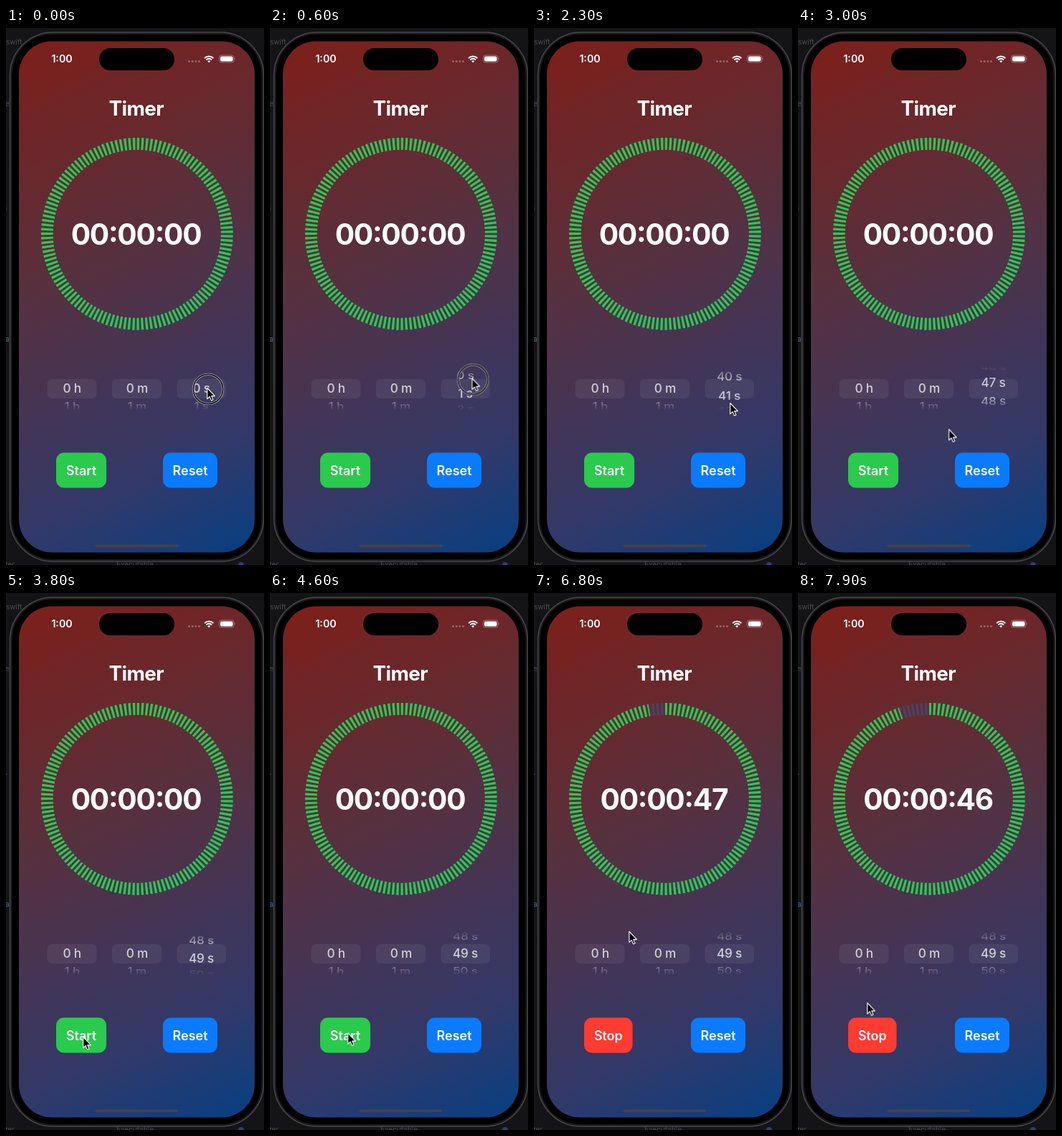
Write an HTML page that moves like this. It is 360 by 748 pixels and loops after 8 s.

```html
<!DOCTYPE html>
<html lang="en">
<head>
<meta charset="utf-8">
<title>Timer</title>
<style>
  html, body { margin: 0; width: 100%; height: 100%; overflow: hidden; background: #141416; }
  svg { display: block; width: 360px; height: 748px; font-family: Inter, Roboto, sans-serif; }
  text { text-anchor: middle; fill: #fff; }
  .code text { text-anchor: start; font-size: 10px; fill: #4b4b50; }
  .title { font-size: 27.8px; font-weight: 700; letter-spacing: -.55px; }
  .clock { font-size: 40.6px; font-weight: 700; letter-spacing: -1.2px; font-feature-settings: "case"; }
  .status { font-size: 14.2px; font-weight: 600; }
  .label { font-size: 18px; font-weight: 600; }
  .wheel { font-size: 17.2px; font-weight: 500; letter-spacing: -.2px; }
  .dial circle { fill: none; stroke-width: 16.8; }

  .start, .stop, .touch { animation: 8s step-end infinite; }
  .start { animation-name: start; }
  .stop { animation-name: stop; }
  .touch { animation-name: touch; }
  .cursor { animation: move 8s ease-in-out infinite; }
  @keyframes start { 0% { opacity: 1 } 58.125%, 100% { opacity: 0 } }
  @keyframes stop { 0% { opacity: 0 } 58.125%, 100% { opacity: 1 } }
  @keyframes touch { 0% { opacity: 1 } 20.25%, 100% { opacity: 0 } }
  @keyframes move {
    0%, 1.25% { transform: translate(282px, 503px); animation-timing-function: cubic-bezier(.33, 0, .67, .33) }
    18.75% { transform: translate(292px, 398px); animation-timing-function: linear }
    20.25% { transform: translate(292px, 335px) }
    28.75%, 33.75% { transform: translate(275px, 524px) }
    42.5%, 52.5% { transform: translate(109px, 620px) }
    55%, 70.6% { transform: translate(110px, 614.5px) }
    76.25%, 85% { transform: translate(134px, 473px); animation-timing-function: ease-in }
    87.5% { transform: translate(83px, 546px); animation-timing-function: ease-out }
    90%, 100% { transform: translate(98px, 572.5px) }
  }
</style>
</head>
<body>
<svg viewBox="0 0 360 748">
  <defs>
    <linearGradient id="sky" gradientUnits="userSpaceOnUse" x1="18" y1="18" x2="347" y2="731">
      <stop stop-color="#7e1f19"/><stop offset=".4" stop-color="#58303d"/>
      <stop offset=".8" stop-color="#333969"/><stop offset="1" stop-color="#063f83"/>
    </linearGradient>
    <linearGradient id="fade" gradientUnits="userSpaceOnUse" x1="0" y1="471" x2="0" y2="533">
      <stop stop-color="#000"/><stop offset=".3" stop-color="#fff"/>
      <stop offset=".7" stop-color="#fff"/><stop offset="1" stop-color="#000"/>
    </linearGradient>
    <mask id="window" maskUnits="userSpaceOnUse" x="40" y="471" width="290" height="62">
      <rect x="40" y="471" width="290" height="62" fill="url(#fade)"/>
    </mask>
    <mask id="left" maskUnits="userSpaceOnUse" x="-140" y="-140" width="280" height="280">
      <circle id="arc" r="125.5" fill="none" stroke="#fff" stroke-width="18"/>
    </mask>
  </defs>

  <g class="code">
    <text x="0" y="23">swift</text>
    <text x="-1" y="109">e</text>
    <text x="-4" y="254" style="fill:#8a4668">s</text>
    <text x="-4" y="345" style="fill:#50689a">t</text>
    <text x="-1" y="437" style="fill:#50689a">a</text>
    <text x="-1" y="751">ter</text>
    <text x="154" y="751">Executable</text>
    <circle cx="328" cy="748" r="4" fill="#20437f"/>
  </g>

  <rect x="5.5" y="6" width="354" height="737" rx="60" fill="#1b1b1d" stroke="#47474a" stroke-width="1.5"/>
  <rect x="8.5" y="9" width="348" height="731" rx="56"/>
  <rect x="18" y="18.5" width="329" height="712" rx="46" fill="url(#sky)"/>
  <rect x="130" y="28" width="105" height="31" rx="15.5"/>

  <text class="status" x="78" y="48">1:00</text>
  <g fill="#fff" fill-opacity=".3">
    <circle cx="255.5" cy="46.5" r="1.4"/><circle cx="260.2" cy="46.5" r="1.4"/>
    <circle cx="264.9" cy="46.5" r="1.4"/><circle cx="269.6" cy="46.5" r="1.4"/>
  </g>
  <g fill="none" stroke="#fff" stroke-width="2">
    <path d="M277 42a8.8 8.8 0 0 1 12.4 0M279.3 44.4a5.5 5.5 0 0 1 7.8 0"/>
    <path d="M281.2 46.2a2.9 2.9 0 0 1 4 0l-2 2.1z" fill="#fff" stroke="none"/>
  </g>
  <rect x="297.5" y="38" width="20.5" height="10" rx="3.2" fill="none" stroke="#fff" stroke-opacity=".45" stroke-width=".8"/>
  <rect x="299" y="39.4" width="17.5" height="7.2" rx="2" fill="#fff"/>
  <path d="M319 41.5q1.5 1.5 0 3z" fill="#fff" fill-opacity=".5"/>

  <text class="title" x="181.8" y="122">Timer</text>
  <g class="dial" transform="translate(182.8 286.8) rotate(-90)">
    <circle class="ticks" r="125.5" stroke="#46456a"/>
    <g mask="url(#left)"><circle class="ticks" r="125.5" stroke="#2aca50"/></g>
  </g>
  <text class="clock" id="clock" x="181.5" y="302">00:00:00</text>

  <g fill="#fff" fill-opacity=".06">
    <rect x="57.5" y="489" width="69" height="27" rx="6.5"/>
    <rect x="148" y="489" width="69" height="27" rx="6.5"/>
    <rect x="238.5" y="489" width="68.5" height="27" rx="6.5"/>
  </g>
  <g class="wheel" id="wheels" mask="url(#window)"></g>

  <g class="label">
    <g class="start">
      <rect x="70" y="591.5" width="70" height="49" rx="11" fill="#2aca4d"/><text x="105" y="622.5">Start</text>
    </g>
    <g class="stop">
      <rect x="70" y="591.5" width="67.5" height="49" rx="11" fill="#ff3b32"/><text x="103.7" y="622.5">Stop</text>
    </g>
    <rect x="219" y="591.5" width="76" height="49" rx="11" fill="#0a7aff"/><text x="257" y="622.5">Reset</text>
  </g>
  <rect x="124.5" y="719.5" width="116" height="3.4" rx="1.7" fill="#4a4148"/>

  <g class="cursor">
    <g class="touch" fill="none">
      <circle r="20.6" stroke="#cfcad0" stroke-opacity=".8" stroke-width="3.2"/>
      <circle r="20.6" stroke="#1a1518" stroke-width="1.7"/>
    </g>
    <path d="M-1.2 -1.5v15.2l3.4-3.2 2.3 5.4 2.5-1.1-2.3-5.2h4.7z" stroke="#fff" stroke-width="1.1" stroke-linejoin="round"/>
  </g>
</svg>
<script>
  const LOOP = 8, TOTAL = 49, START = 4.65, FADE = .4;
  const TICKS = [5.62, 6.63, 7.7];
  const RADIUS = 35, ROW_ANGLE = .755, MID = 502;
  const arc = document.getElementById('arc');
  const clock = document.getElementById('clock');
  const wheels = document.getElementById('wheels');
  const length = 2 * Math.PI * 125.5, pitch = length / 131;

  const clamp = x => Math.min(1, Math.max(0, x));
  const ease = x => x * x * (3 - 2 * x);

  document.querySelectorAll('.ticks').forEach(ring =>
    ring.setAttribute('stroke-dasharray', `${pitch * .52} ${pitch * .48}`));

  function makeWheel(x, unit) {
    const rows = Array.from({ length: 5 }, () =>
      wheels.appendChild(document.createElementNS('http://www.w3.org/2000/svg', 'text')));
    return pos => rows.forEach((row, i) => {
      const n = Math.round(pos) + i - 2;
      const angle = (n - pos) * ROW_ANGLE;
      const shown = n >= 0 && Math.abs(angle) < 1.5;
      row.textContent = shown ? `${n} ${unit}` : '';
      if (!shown) return;
      const y = MID + RADIUS * Math.sin(angle), squash = Math.cos(angle);
      row.setAttribute('transform', `translate(${x} ${y}) scale(1 ${squash}) translate(0 6.2)`);
      row.setAttribute('fill-opacity', .75 * squash);
    });
  }

  const hours = makeWheel(92.3, 'h');
  const minutes = makeWheel(182.8, 'm');
  const seconds = makeWheel(272.6, 's');
  hours(0);
  minutes(0);

  // Drag, flick, then exponential slow-down to the chosen row.
  function scroll(t) {
    const glide = s => TOTAL - 8.37 * Math.exp((2.3 - s) / .437);
    if (t < 1.5) return 5.63 * clamp((t - .1) / 1.4) ** 2;
    if (t < 1.62) return 5.63 + (glide(1.62) - 5.63) * (t - 1.5) / .12;
    return t < 4.4 ? glide(t) : TOTAL;
  }

  function draw(t) {
    seconds(scroll(t));
    const passed = TICKS.filter(s => t >= s).length;
    const left = t < START ? 0 : TOTAL - passed;
    clock.textContent = '00:00:' + String(left).padStart(2, '0');
    const gone = TICKS.reduce((sum, s) => sum + ease(clamp((t - s) / FADE)), 0);
    arc.setAttribute('stroke-dasharray', `${length * (1 - gone / TOTAL)} ${gone ? length : 0}`);
  }

  let origin;
  function frame(now) {
    origin ??= now;
    draw((now - origin) / 1000 % LOOP);
    requestAnimationFrame(frame);
  }
  draw(0);
  requestAnimationFrame(frame);
</script>
</body>
</html>
```
